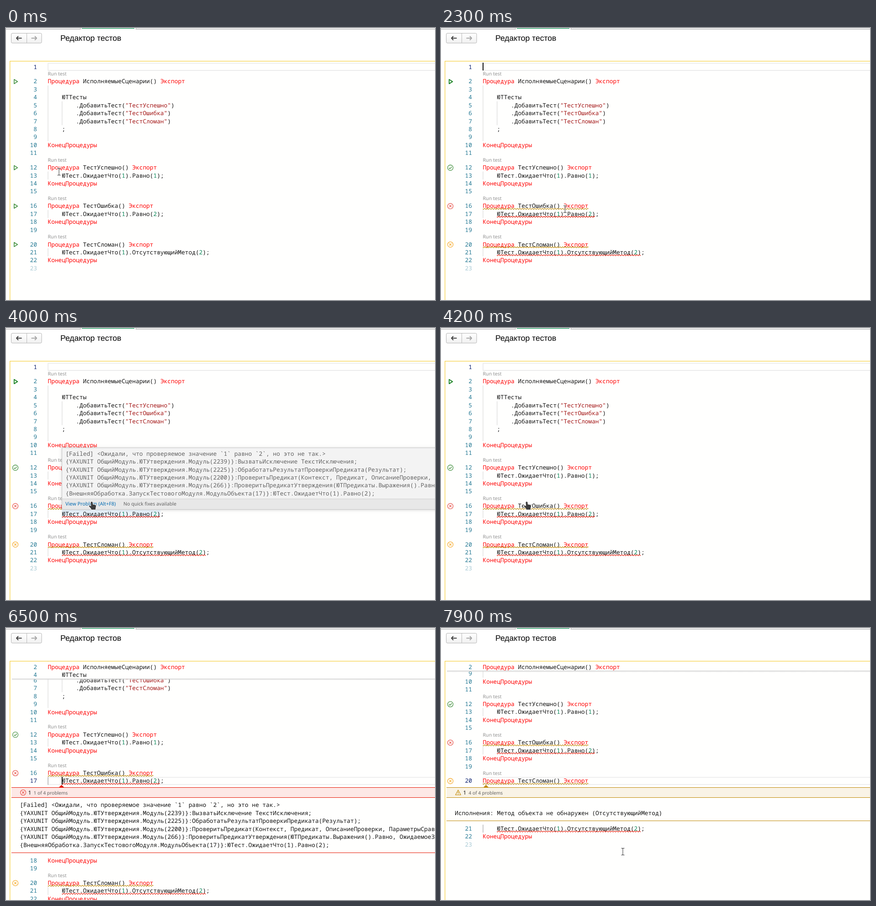
These frames come from a looping animation (939x596 px, 8 s). An HTML page with a canvas:

```html
<!DOCTYPE html>
<html lang="ru">
<head>
<meta charset="utf-8">
<title>Редактор тестов</title>
<style>
  html, body { margin: 0; width: 100%; height: 100%; overflow: hidden; background: #fff; }
  canvas { display: block; }
</style>
</head>
<body>
<canvas id="stage" width="939" height="596"></canvas>
<script>
const ctx = document.getElementById('stage').getContext('2d');
const W = 939, H = 596, LOOP = 8000, STEP = 100;
const ROW = 17.42, LENS = 14.5, TOP = 76.5, LEFT = 91.5, CHAR = 7.7, BASE = 13.05;
const MONO = '12.833px "Noto Sans Mono", "DejaVu Sans Mono", monospace';
const sans = size => `${size}px "Noto Sans", "Open Sans", sans-serif`;

const RED = '#e51400', GOLD = '#bf8803', GREEN = '#388a34', ORANGE = '#f5a31a', FAIL = '#e5453c';
const TEAL = '#237893', NAVY = '#0b216f', INK = '#111', PAPER = '#fffffe';

const code = `
Процедура ИсполняемыеСценарии() Экспорт

    ЮТТесты
        .ДобавитьТест("ТестУспешно")
        .ДобавитьТест("ТестОшибка")
        .ДобавитьТест("ТестСломан")
    ;

КонецПроцедуры

Процедура ТестУспешно() Экспорт
    ЮТест.ОжидаетЧто(1).Равно(1);
КонецПроцедуры

Процедура ТестОшибка() Экспорт
    ЮТест.ОжидаетЧто(1).Равно(2);
КонецПроцедуры

Процедура ТестСломан() Экспорт
    ЮТест.ОжидаетЧто(1).ОтсутствующийМетод(2);
КонецПроцедуры
`.split('\n');

const failure = `[Failed] <Ожидали, что проверяемое значение \`1\` равно \`2\`, но это не так.>
{YAXUNIT ОбщийМодуль.ЮТУтверждения.Модуль(2239)}:ВызватьИсключение ТекстИсключения;
{YAXUNIT ОбщийМодуль.ЮТУтверждения.Модуль(2225)}:ОбработатьРезультатПроверкиПредиката(Результат);
{YAXUNIT ОбщийМодуль.ЮТУтверждения.Модуль(2200)}:ПроверитьПредикат(Контекст, Предикат, ОписаниеПроверки, ПараметрыСравнения);
{YAXUNIT ОбщийМодуль.ЮТУтверждения.Модуль(266)}:ПроверитьПредикатУтверждения(ЮТПредикаты.Выражения().Равно, ОжидаемоеЗначение);
{ВнешняяОбработка.ЗапускТестовогоМодуля.МодульОбъекта(17)}:ЮТест.ОжидаетЧто(1).Равно(2);`.split('\n');
const broken = ['', 'Исполнения: Метод объекта не обнаружен (ОтсутствующийМетод)'];

const lensRows = [2, 12, 16, 20];
const squiggles = [[16, 0, 30, GOLD], [17, 4, 28, RED], [20, 0, 30, GOLD], [21, 4, 41, RED]];

const views = [
  { from: 0, scroll: 0, row: 1, col: 0, sticky: [] },
  { from: 4500, scroll: 72.3, row: 17, col: 4, sticky: [2, 4], color: RED, tint: '#fde8e6',
    zone: 9, end: 492, arrow: 121.5, title: '1 of 4 problems', text: failure },
  { from: 7000, scroll: 139.1, row: 20, col: 0, sticky: [2], color: GOLD, tint: '#f9f3e6',
    zone: 5, end: 422, arrow: 98.5, title: '4 of 4 problems', text: broken }
];
const caretOn = [[1400, 1800], [2200, 2800], [3200, 3700], [4500, 5000], [5500, 6000], [6500, 7500]];
const results = 1800, hoverOn = 3200, hoverOff = 4200;

// time, x, y of the pointer
const paths = [
  [[0, 116, 315], [500, 111.5, 285], [1400, 111.5, 285], [2200, 277, 414], [2300, 271.5, 397],
   [2700, 271.5, 397], [2800, 256.5, 401.5], [3500, 256.5, 401.5], [4000, 187.5, 380.5],
   [4700, 187.5, 380.5], [5200, 378, 394]],
  [[7700, 667, 440], [7900, 398, 490]]
];

function text(str, x, y, color, font = MONO, align = 'left') {
  ctx.font = font;
  ctx.textAlign = align;
  ctx.fillStyle = color;
  ctx.fillText(str, x, y);
}

function rect(x, y, w, h, color) {
  ctx.fillStyle = color;
  ctx.fillRect(x, y, w, h);
}

function line(points, color, width = 1, close = false) {
  ctx.beginPath();
  points.forEach(([x, y]) => ctx.lineTo(x, y));
  if (close) ctx.closePath();
  ctx.strokeStyle = color;
  ctx.lineWidth = width;
  ctx.stroke();
}

function triangle(points, color) {
  ctx.beginPath();
  points.forEach(([x, y]) => ctx.lineTo(x, y));
  ctx.fillStyle = color;
  ctx.fill();
}

const rowTop = (n, view) => TOP - view.scroll + (n - 1) * ROW
  + LENS * lensRows.filter(r => r <= n).length
  + (view.zone && n > view.row ? view.zone * ROW : 0);

function tokenColor(token) {
  if (/^(Процедура|КонецПроцедуры|Экспорт)$/.test(token)) return '#f00';
  if (token[0] === '"') return '#a31515';
  return /^\d/.test(token) ? '#098658' : INK;
}

function codeLine(n, top) {
  for (const m of code[n - 1].matchAll(/"[^"]*"|[А-яЁё]+|\d+|[^\s"А-яЁё\d]+/g))
    text(m[0], LEFT + m.index * CHAR, top + BASE, tokenColor(m[0]));
}

function lineNumber(n, top, color = TEAL) {
  text(n, 68, top + BASE, color, MONO, 'right');
}

function badge(x, y, color, ok) {
  ctx.beginPath();
  ctx.arc(x, y, 6, 0, Math.PI * 2);
  ctx.strokeStyle = color;
  ctx.lineWidth = 1.1;
  ctx.stroke();
  if (ok) return line([[x - 3, y + .3], [x - 1, y + 2.3], [x + 3.2, y - 2]], color, 1.3);
  line([[x - 2.4, y - 2.4], [x + 2.4, y + 2.4]], color, 1.1);
  line([[x - 2.4, y + 2.4], [x + 2.4, y - 2.4]], color, 1.1);
}

function gutterIcon(n, y, done) {
  if (!done || n === 2)
    return line([[17.8, y - 4.7], [25.3, y], [17.8, y + 4.7]], done ? '#14801c' : GREEN, done ? 1.8 : 1.5, true);
  badge(20.5, y, { 12: GREEN, 16: FAIL, 20: ORANGE }[n], n === 12);
}

function squiggle(x, y, width, color) {
  const points = [];
  for (let i = 0; i <= width; i += 1.375)
    points.push([x + i, y + 1.2 * Math.sin(i / 5.5 * Math.PI * 2)]);
  line(points, color, 1.1);
}

function header() {
  rect(0, 0, W, 2, '#f3f3f3');
  rect(0, 2, W, 1.2, '#b0b0b0');
  rect(163, 0, 122, 3.2, '#fff');
  rect(162.5, 0, 1, 3, '#b0b0b0');
  rect(284, 0, 1, 3, '#b0b0b0');
  rect(166, 0, 115, 1.3, '#169c5a');

  ctx.beginPath();
  ctx.roundRect(11.5, 11.5, 66.5, 21.5, 2.5);
  const shade = ctx.createLinearGradient(0, 12, 0, 33);
  shade.addColorStop(0, '#fff');
  shade.addColorStop(1, '#f1f1f1');
  ctx.fillStyle = shade;
  ctx.fill();
  ctx.strokeStyle = '#b3b3b3';
  ctx.lineWidth = 1;
  ctx.stroke();
  line([[45.5, 12], [45.5, 33]], '#b9b9b9');
  for (const [x, dir, color] of [[28.5, -1, '#404040'], [61.5, 1, '#a5a5a5']]) {
    line([[x - 6 * dir, 22.3], [x + 5 * dir, 22.3]], color, 2);
    line([[x + 1.5 * dir, 18], [x + 5.5 * dir, 22.3], [x + 1.5 * dir, 26.6]], color, 2);
  }
  text('Редактор тестов', 119, 28.3, '#000', '17.5px "Liberation Sans", Arial, sans-serif');
}

function guides(n, top, view) {
  const active = view.zone && (n === 17 && view.row === 17 || n === 21 && view.row === 20);
  if ((n > 2 && n < 10) || [13, 17, 21].includes(n))
    rect(LEFT, top, 1, ROW, active ? '#939393' : '#d3d3d3');
  if (n > 4 && n < 8) rect(LEFT + 4 * CHAR, top, 1, ROW, '#d3d3d3');
}

function editorBody(view, t, hoverLens) {
  const done = t >= results;
  const current = rowTop(view.row, view);
  ctx.strokeStyle = '#ececec';
  ctx.lineWidth = 1.8;
  ctx.strokeRect(LEFT + .5, current + .9, W, ROW - 1.8);
  if (t >= hoverOn && t < hoverOff)
    rect(LEFT + 4 * CHAR, rowTop(17, view), 28 * CHAR, ROW, 'rgba(173,214,255,.25)');

  for (let n = 1; n <= 23; n++) {
    const top = rowTop(n, view);
    guides(n, top, view);
    lineNumber(n, top, n === view.row ? NAVY : n === 23 ? '#a7c9d4' : TEAL);
    codeLine(n, top);
    if (!lensRows.includes(n)) continue;
    const hot = hoverLens && n === 12;
    text('Run test', LEFT, top - 4.4, hot ? '#00f' : '#919191', sans(10.6));
    gutterIcon(n, top + 9, done);
  }
  if (done) for (const [n, col, len, color] of squiggles)
    squiggle(LEFT + col * CHAR, rowTop(n, view) + 15, len * CHAR, color);
}

function messages(rows, x, y, color) {
  rows.forEach((row, i) => text(row, x, y + i * ROW, color));
}

function peek(view) {
  const { color, arrow, end } = view;
  rect(12, 349, W, end - 349, PAPER);
  rect(12, 349, W, 22, view.tint);
  triangle([[arrow - 6, 349.5], [arrow, 343.8], [arrow + 6, 349.5]], color);
  for (const y of [349, 371, end]) rect(12, y, W, 1, color);
  if (color === RED) badge(37.5, 360.5, FAIL);
  else {
    line([[37.5, 355], [43.3, 365.8], [31.7, 365.8]], color, 1.1, true);
    line([[37.5, 358.8], [37.5, 362.4]], color, 1.2);
    rect(36.9, 363.2, 1.2, 1.2, color);
  }
  text('1', 48.5, 364.8, INK, sans(11.9));
  text(view.title, 60.5, 364.5, '#616161', sans(10.2));
  messages(view.text, 30.2, 392.4, INK);
}

function stickyRows(view) {
  const rows = view.sticky;
  if (!rows.length) return;
  const bottom = TOP + rows.length * ROW;
  rect(10, 74, W, bottom - 74, PAPER);
  const shade = ctx.createLinearGradient(0, bottom - .5, 0, bottom + 3.5);
  shade.addColorStop(0, '#ccc');
  shade.addColorStop(1, 'rgba(221,221,221,0)');
  rect(13, bottom - .5, W, 4, shade);
  rows.forEach((n, i) => {
    lineNumber(n, TOP + i * ROW);
    codeLine(n, TOP + i * ROW);
  });
}

function tooltip() {
  ctx.save();
  ctx.shadowColor = 'rgba(0,0,0,.16)';
  ctx.shadowBlur = 6;
  ctx.shadowOffsetY = 1;
  rect(122, 262, W, 136, '#c8c8c8');
  ctx.restore();
  rect(123, 263, W, 134, '#f3f3f3');
  rect(123, 374, W, 1, '#d0d0d0');
  rect(123, 375, W, 22, '#e8e8e8');
  messages(failure, 130.2, 279.8, '#616161');
  text('View Problem (Alt+F8)', 130, 389, '#006ab1', sans(10.8));
  text('No quick fixes available', 257, 389, '#616161', sans(10.6));
}

function pointerAt(t) {
  const path = paths.find(p => t >= p[0][0] && t <= p[p.length - 1][0]);
  if (!path) return null;
  const i = Math.max(1, path.findIndex(p => p[0] >= t));
  const [t0, x0, y0] = path[i - 1], [t1, x1, y1] = path[i];
  const k = (t - t0) / (t1 - t0);
  const x = x0 + (x1 - x0) * k, y = y0 + (y1 - y0) * k;
  const lens = x < 133 && y < 296;
  const link = t >= 3600 && t <= 4700 && x < 242 && y < 394;
  return { x, y, lens, hand: lens || link };
}

function beam(x, y) {
  const shape = [
    [[x - 3.5, y - 7.5], [x - 1, y - 7.5], [x, y - 6.5], [x + 1, y - 7.5], [x + 3.5, y - 7.5]],
    [[x, y - 6.5], [x, y + 6.5]],
    [[x - 3.5, y + 7.5], [x - 1, y + 7.5], [x, y + 6.5], [x + 1, y + 7.5], [x + 3.5, y + 7.5]]
  ];
  shape.forEach(s => line(s, 'rgba(255,255,255,.8)', 2.6));
  shape.forEach(s => line(s, '#444', 1.1));
}

function hand(x, y) {
  ctx.save();
  ctx.translate(x, y);
  ctx.beginPath();
  ctx.moveTo(-2, 1.5);
  ctx.quadraticCurveTo(-1.8, 0, 0, 0);
  ctx.quadraticCurveTo(1.8, 0, 2, 1.5);
  ctx.lineTo(2.4, 6);
  ctx.lineTo(7.5, 7);
  ctx.quadraticCurveTo(9.8, 7.6, 9.6, 10);
  ctx.lineTo(8.6, 14.5);
  ctx.lineTo(8.4, 17.5);
  ctx.lineTo(-.5, 17.5);
  ctx.lineTo(-1.5, 15);
  ctx.lineTo(-5.8, 10.3);
  ctx.quadraticCurveTo(-6, 8.2, -4, 8.6);
  ctx.lineTo(-1.3, 10);
  ctx.closePath();
  ctx.strokeStyle = 'rgba(255,255,255,.85)';
  ctx.lineWidth = 2;
  ctx.stroke();
  ctx.fillStyle = '#3d3d3d';
  ctx.fill();
  ctx.restore();
}

function draw(t) {
  const view = views.filter(v => t >= v.from).pop();
  const pointer = pointerAt(t);
  ctx.textRendering = 'geometricPrecision';
  ctx.lineJoin = 'round';
  rect(0, 0, W, H, '#fff');
  header();
  rect(8, 72, W, H, '#f6d24a');
  rect(9.3, 73.3, W, H, PAPER);

  ctx.save();
  ctx.beginPath();
  ctx.rect(9.3, 73.3, W, H);
  ctx.clip();
  editorBody(view, t, pointer && pointer.lens);
  if (view.zone) peek(view);
  stickyRows(view);
  if (caretOn.some(([a, b]) => t >= a && t < b))
    rect(LEFT + view.col * CHAR - .4, rowTop(view.row, view) - .5, 1.9, 17, '#000');
  if (t >= hoverOn && t < hoverOff) tooltip();
  ctx.restore();

  if (pointer) (pointer.hand ? hand : beam)(pointer.x, pointer.y);
}

function tick() {
  const t = performance.now() % LOOP;
  draw(Math.floor(t / STEP) * STEP);
  requestAnimationFrame(tick);
}
tick();
</script>
</body>
</html>
```
